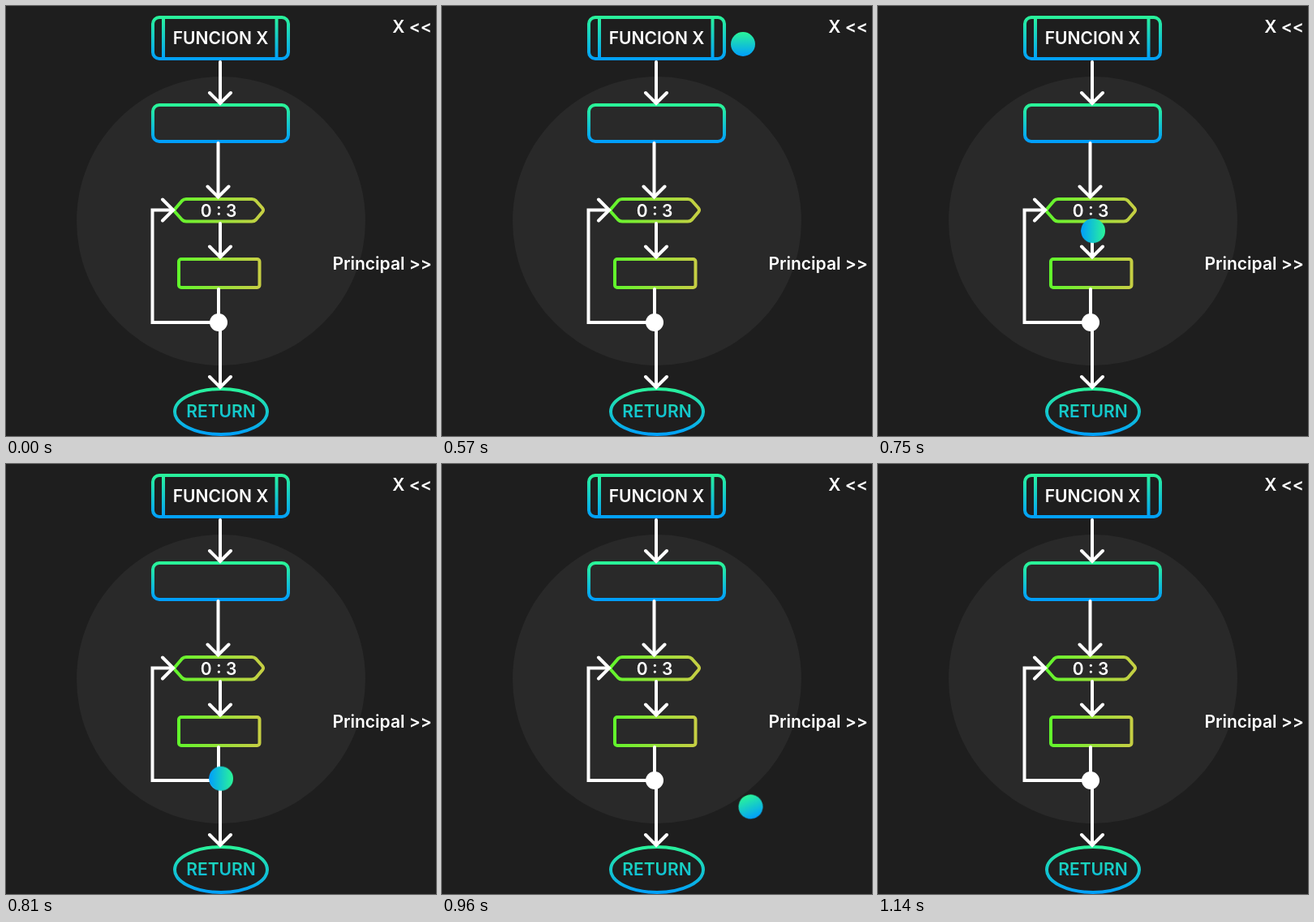
An HTML page that plays this animation: 530x530 px, repeating every 1830 ms.

```html
<!DOCTYPE html>
<html lang="es">
<head>
<meta charset="utf-8">
<title>Diagrama de flujo</title>
<style>
  html, body {
    margin: 0;
    width: 100%;
    height: 100%;
    overflow: hidden;
    background: #1e1e1e;
  }
  svg { display: block; width: 100%; height: 100%; }
  text { font: 600 21px Inter, sans-serif; fill: #fff; }
  .mid { text-anchor: middle; }
  .end { text-anchor: end; }
  .shape { fill: none; stroke-width: 4; stroke-linejoin: round; }
  .arrow {
    fill: none;
    stroke: #fff;
    stroke-width: 4;
    stroke-linecap: round;
    stroke-linejoin: miter;
  }

  /* The loop is 61 ticks of 30 ms; the ball moves once per tick. */
  .ball { animation: travel 1830ms infinite; }
  @keyframes travel {
    0% { transform: translate(600px, 47px) rotate(0deg); animation-timing-function: step-end; }
    26.229% { transform: translate(533px, 47px) rotate(0deg); animation-timing-function: steps(4); }
    32.786% { transform: translate(317px, 47px) rotate(0deg); animation-timing-function: step-end; }
    34.426% { transform: translate(265px, 56px) rotate(90deg); animation-timing-function: steps(7); }
    45.901% { transform: translate(265px, 443px) rotate(90deg); animation-timing-function: step-end; }
    47.54% { transform: translate(272px, 494px) rotate(45deg); animation-timing-function: step-end; }
    49.18% { transform: translate(327px, 472px) rotate(0deg); animation-timing-function: steps(4); }
    55.737% { transform: translate(434px, 373px) rotate(-45deg); animation-timing-function: steps(4); }
    62.294% { transform: translate(541px, 274px) rotate(-45deg); animation-timing-function: step-end; }
    62.295%, 100% { transform: translate(600px, 47px) rotate(0deg); }
  }
</style>
</head>
<body>
<svg viewBox="0 0 530 530">
  <defs>
    <linearGradient id="sea" x2="0" y2="1">
      <stop stop-color="#2af598"/>
      <stop offset="1" stop-color="#009efd"/>
    </linearGradient>
    <linearGradient id="seaTop" href="#sea" gradientUnits="userSpaceOnUse" x1="0" y1="12" x2="0" y2="67"/>
    <linearGradient id="seaEnd" href="#sea" gradientUnits="userSpaceOnUse" x1="0" y1="470" x2="0" y2="530"/>
    <linearGradient id="lime">
      <stop stop-color="#62f52c"/>
      <stop offset="1" stop-color="#c6cf43"/>
    </linearGradient>
    <path id="head" d="M-13-13 0 0 13-13"/>
  </defs>

  <circle cx="265" cy="265" r="178" fill="#292929"/>

  <g class="shape">
    <rect x="181" y="14" width="167" height="51" rx="8" stroke="url(#seaTop)"/>
    <path d="M194 14V65M333.500 14V65" stroke="url(#seaTop)"/>
    <rect x="181" y="122" width="167" height="45" rx="8" stroke="url(#sea)"/>
    <path d="M208.500 250 217 240Q219 238 222 238H303Q306 238 308 240L316 249Q318 251.500 316 254L308 263.500Q306 265.500 303 265.500H222Q219 265.500 217 263.500L208.500 254Q207 252 208.500 250Z" stroke="url(#lime)"/>
    <rect x="213" y="312" width="99.500" height="35" rx="3" stroke="url(#lime)"/>
    <ellipse cx="265" cy="500" rx="57" ry="28" stroke="url(#seaEnd)"/>
  </g>

  <g class="arrow">
    <path d="M264 69V119M261.500 169V235M264 268V309M262 349V390M264 400V469"/>
    <path d="M262 390H180.500V251.500H205"/>
    <use href="#head" x="264" y="120"/>
    <use href="#head" x="261.500" y="235.500"/>
    <use href="#head" x="264" y="309.500"/>
    <use href="#head" x="264" y="470"/>
    <use href="#head" transform="translate(206 251.500) rotate(-90)"/>
  </g>
  <circle cx="262" cy="390" r="11" fill="#fff"/>

  <text class="mid" x="264.500" y="47">FUNCION X</text>
  <text class="mid" x="262" y="259.500">0 : 3</text>
  <text class="mid" x="265" y="507" style="fill: url(#seaEnd)">RETURN</text>
  <text class="end" x="525" y="33">X &lt;&lt;</text>
  <text class="end" x="525" y="325">Principal &gt;&gt;</text>

  <circle class="ball" r="15" fill="url(#sea)"/>
</svg>
</body>
</html>
```
